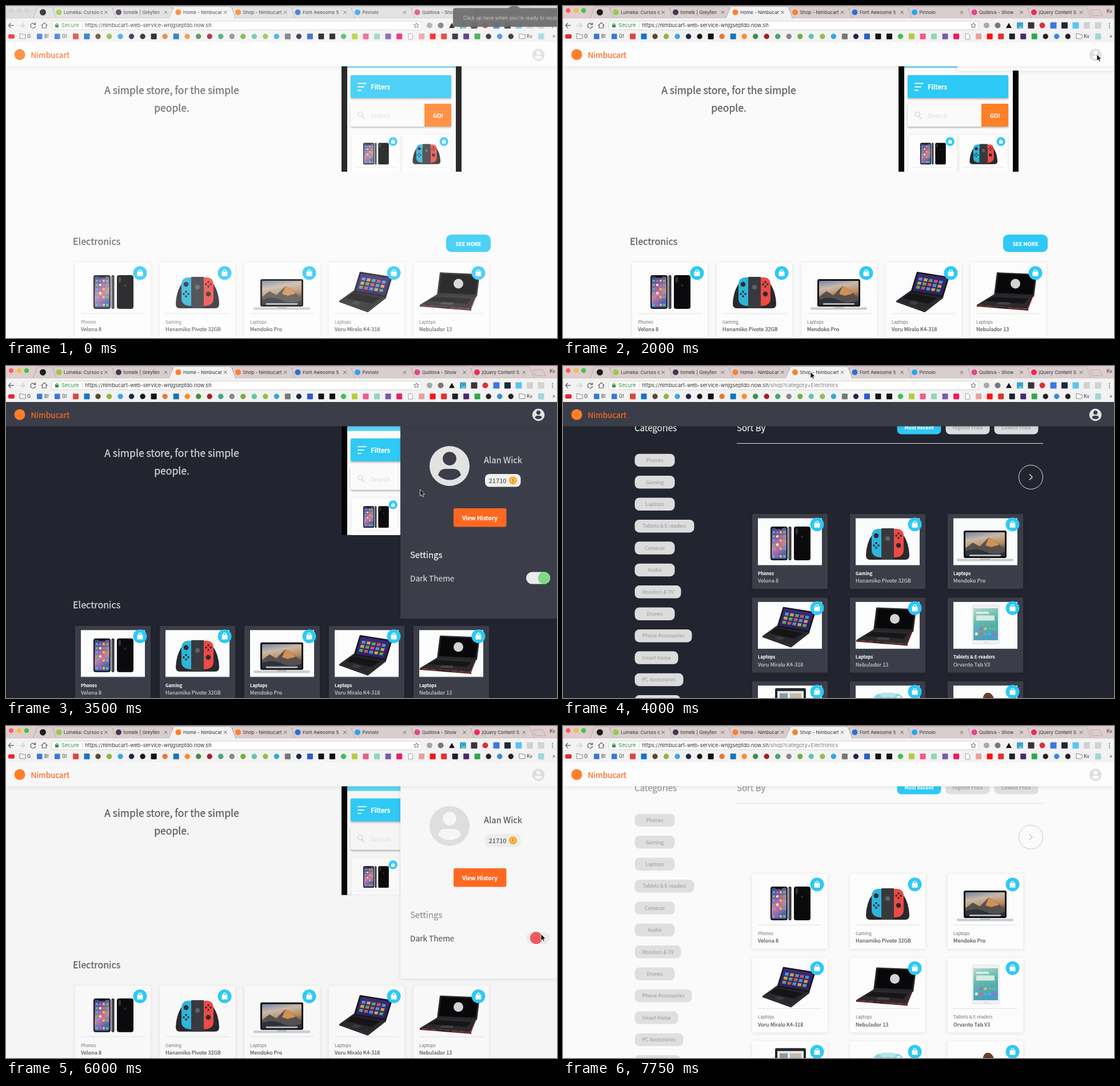
These frames come from a looping animation (964x581 px, 8000 ms). An HTML page:

```html
<!DOCTYPE html>
<html lang="en">
<head>
<meta charset="utf-8">
<title>Store theme demo</title>
<style>
html, body { margin: 0; width: 100%; height: 100%; overflow: hidden; background: #fafafa; }
svg { display: block; width: 100vw; height: 100vh; }
text { font-family: "Noto Sans CJK JP", "Noto Sans CJK SC", "Noto Sans CJK", "Noto Sans", sans-serif; white-space: pre; }
.ui text { font-family: Inter, Roboto, sans-serif; stroke: none; }
svg, .lit {
  --bg: #fafafa; --bar: #fcfcfc; --card: #fcfcfc; --img: #fcfcfc; --ink: #5f5f5f; --name: #4c4c4c;
  --cat: #868686; --catw: 400; --head: #999; --line: #dedede; --pill: #dfdfdf; --pilltext: #a2a2a2;
  --user: #dedede; --hole: #f8f8f8; --coin: #ececec; --arrow: #c6c6c6; --track: #ebebeb;
  --strip: #dfcccd; --tab: #d9cdce; --shade: rgba(0,0,0,.1);
}
svg.dim, .dim .lit { --bg: #f5f5f5; --bar: #f7f7f7; --card: #f8f8f8; --img: #f8f8f8; --hole: #f6f6f6; }
svg.dark {
  --bg: #22252f; --bar: #3b3e48; --card: #3b3e48; --img: #fcfcfc; --ink: #d2d2d5; --name: #d0d0d3;
  --cat: #f4f4f4; --catw: 700; --head: #ececee; --line: #e0e0e0; --pill: #dcdcdc; --pilltext: #a2a2a2;
  --user: #e2e2e2; --hole: #3b3e48; --coin: #f0f0f0; --arrow: #e4e4e4; --track: #ececec;
}
svg.idle { --strip: #d6d6d6; --tab: #dedede; }
.cat { font-weight: var(--catw); }
.shade { filter: drop-shadow(0 1px 3px var(--shade)); }
.lift { filter: drop-shadow(0 2px 1.5px rgba(0,0,0,.28)); }
svg.shop .home, svg:not(.shop) .shoponly { display: none; }
.light { fill: #ccc; }
svg:not(.idle) .light:nth-of-type(1) { fill: #f9605a; }
svg:not(.idle) .light:nth-of-type(2) { fill: #f6bd3b; }
svg:not(.idle) .light:nth-of-type(3) { fill: #3fc64a; }
</style>
</head>
<body>
<svg id="stage" viewBox="0 0 964 581" xmlns="http://www.w3.org/2000/svg"></svg>
<script>
const SKY = '#2ec9f4', ORANGE = '#ff7f27', HOT = '#ff6821';

const R = (x, y, w, h, fill, rx = 0, more = '') =>
  `<rect x="${x}" y="${y}" width="${w}" height="${h}" rx="${rx}" fill="${fill}" ${more}/>`;
const C = (x, y, r, fill, more = '') => `<circle cx="${x}" cy="${y}" r="${r}" fill="${fill}" ${more}/>`;
const P = (d, fill, more = '') => `<path d="${d}" fill="${fill}" ${more}/>`;
const L = (d, color, w = 1) => P(d, 'none', `stroke="${color}" stroke-width="${w}" stroke-linecap="round"`);
// A hairline outline gives the lettering its medium weight
const T = (x, y, s, size, fill, more = '') =>
  `<text x="${x}" y="${y}" font-size="${size}" fill="${fill}" stroke="${fill}" stroke-width="${size * .018}" ${more}>${s}</text>`;
const G = (more, ...parts) => `<g ${more}>${parts.join('')}</g>`;
const MID = 'text-anchor="middle"', BOLD = 'font-weight="700"';
const times = (n, f) => Array.from({ length: n }, (_, i) => f(i)).join('');
const gradient = (id, ...stops) => `<linearGradient id="${id}" x2=".3" y2="1">` +
  stops.map((c, i) => `<stop offset="${i / (stops.length - 1)}" stop-color="${c}"/>`).join('') + '</linearGradient>';

const defs = `<defs>${gradient('glow', '#33457f', '#75609c', '#d67c9a', '#4a62b4')}
  ${gradient('dusk', '#6f86a8', '#c9b9a8', '#b98a5c', '#3a3c44')}
  ${gradient('win', '#3b2c78', '#2f2160')}${gradient('sea', '#b9d9cf', '#5fb8a8', '#4a9ec0')}
  <clipPath id="device"><path d="M580 60H800V290H580Z"/></clipPath></defs>`;

// Product pictures, placed relative to their card's corner
const TILES = ['#4fb0e8', '#e8664f', '#f2f2f2', '#63c46a', '#f2c04a', '#c45ab8'];
const icons = (x, y, cols, rows, dx, dy, s) => times(cols * rows, i =>
  R(x + i % cols * dx, y + Math.floor(i / cols) * dy, s, s, TILES[(i * 5 + (i >> 2)) % 6], 1));

const art = {
  phone: R(32, 22, 30, 59, '#151518', 4) + R(34, 24.5, 26, 54, 'url(#glow)', 2.5) + R(41, 24, 12, 2.5, '#151518', 1) +
    icons(36, 30, 4, 5, 6, 7.2, 3.8) + icons(36, 72, 4, 1, 6, 6, 4) +
    R(63.5, 22, 5, 59, '#2c2d33', 2) + R(65, 24, 1, 55, '#777') +
    R(73, 22, 29, 59, '#0b0b0d', 4) + R(76, 25, 4, 10, '#33343a', 2) + C(87.5, 40, 2, '#2a2a2d'),
  pads: P('M39 36Q29 50 28 72Q28 80 35 80H97Q104 80 104 72Q103 50 93 36Z', '#29292c') +
    P('M55 26H49Q38 27 38 39V64Q39 76 55 76Z', '#2fb4da') + P('M77 26H83Q94 27 94 39V64Q93 76 77 76Z', '#ee4a46') +
    R(55, 25, 22, 55, '#38393d', 1) + C(66, 43, 4, '#606166') +
    C(46, 38, 4.3, '#2b2b2e') + C(85, 55, 4.3, '#2b2b2e') +
    times(4, i => { const a = i * Math.PI / 2, x = 4 * Math.cos(a), y = 4 * Math.sin(a);
      return C(46 + x, 55 + y, 1.7, '#222') + C(85 + x, 38 + y, 1.7, '#222'); }),
  book: R(28, 29, 75, 48, '#101012', 3) + R(31, 32, 69, 42, 'url(#dusk)') +
    P('M31 60L44 50L56 57L72 41L82 46L100 62V74H31Z', '#55504e') + P('M72 41L82 46L90 54L76 58L66 55Z', '#d08f55') +
    P('M31 65Q50 58 66 66T100 66V74H31Z', '#2f3238') + R(38, 71, 55, 3, '#aeb4bd', 1) +
    R(16, 78, 99, 4.5, '#c8c9cc', 2) + R(16, 77.5, 99, 1.5, '#e4e4e6') + R(57, 78, 17, 1.5, '#a5a6a9'),
  tiles: P('M43 49L100 60L68 85L18 67Z', '#29292d') + P('M42 53L90 62L74 72L30 62Z', '#151518') +
    P('M46 67L57 70L51 75L39 71Z', '#3c3c40') + P('M18 67L68 85L100 60V62L68 87L18 69Z', '#111') +
    G('transform="matrix(57 9 -11 36 54 16)"', R(0, 0, 1, 1, '#18181b', .03), R(.05, .07, .9, .84, 'url(#win)'),
      times(15, i => R(.12 + i % 5 * .155, .24 + Math.floor(i / 5) * .2, .11, .14, TILES[(i * 4 + (i >> 1)) % 6], 0, 'opacity=".8"'))),
  gamer: P('M42 55L110 58L101 81L11 74Z', '#2b2a2d') + P('M40 60L101 63L94 72L26 67Z', '#161618') +
    P('M50 69L70 70L68 74L46 73Z', '#454347') + P('M11 74L101 81V84L11 77Z', '#3a1a1c') + L('M14 76L40 78M66 80L99 82L109 60', '#b5342f') +
    G('transform="matrix(70 3 -5 40 46 17)"', R(0, 0, 1, 1, '#262528', .03), R(.04, .06, .92, .84, '#08080a')) +
    C(78.5, 37, 8.5, '#d2d2d2'),
  tablet: R(43, 13, 47, 68, '#f2f2f2', 3, 'stroke="#d5d5d5" stroke-width=".7"') + R(45, 18.5, 43, 56, 'url(#sea)') +
    R(50, 25, 22, 3, '#e8f4ef') + R(50, 31, 32, 9, '#d2ebe3', 1) + icons(48, 52, 5, 2, 7.8, 9, 4.5) + R(62, 77, 9, 2.2, '#ddd', 1),
  slate: R(40, 12, 54, 60, '#242529', 3) + R(44, 17, 46, 50, '#e5e8ea') + R(48, 21, 14, 9, '#8a98a0') + R(66, 21, 20, 9, '#c4b8a8'),
  cam: R(42, 22, 50, 50, '#8fd3e0', 9) + R(54, 20, 26, 8, '#b5e4ec', 4) + C(67, 42, 13, '#3a4a52') + R(82, 26, 6, 5, '#e8f6f8', 1),
  watch: P('M61 34Q62 20 70 20Q79 20 82 34V60H61Z', '#6b3f2a') + C(71, 41, 13, '#2a2a2d')
};

const bag = (x, y, r) => G(`transform="translate(${x} ${y}) scale(${r / 12})"`, C(0, 0, 12, SKY),
  R(-5, -2.5, 10, 8, '#fff', 1), L('M-2.6 -2V-4Q0 -7.5 2.6 -4V-2', '#fff', 1.3));

const card = (x, y, [pic, cat, name], k = 1) => G(`transform="translate(${x} ${y}) scale(${k})"`,
  R(0, 0, 132, 131, 'var(--card)', 2, 'class="shade"'), R(10, 7.5, 112, 81.5, 'var(--img)'), art[pic],
  R(10, 88.7, 112, .9, 'var(--line)'), bag(113.5, 18.3, 12),
  T(10, 107, cat, 7.7, 'var(--cat)', 'class="cat"'), T(10, 120.3, name, 9.1, 'var(--name)'));

const goods = [
  ['phone', 'Phones', 'Velona 8'], ['pads', 'Gaming', 'Hanamiko Pivote 32GB'], ['book', 'Laptops', 'Mendoko Pro'],
  ['tiles', 'Laptops', 'Voru Miralo K4-318'], ['gamer', 'Laptops', 'Nebulador 13'],
  ['tablet', 'Tablets &amp; E-readers', 'Orvanto Tab V3'],
  ['slate', 'Tablets', ''], ['cam', 'Cameras', ''], ['watch', 'Watches', '']
];

const person = (x, y, r) => G(`transform="translate(${x} ${y}) scale(${r})"`, C(0, 0, 1, 'var(--user)'),
  C(0, -.37, .34, 'var(--hole)'),
  P('M-.57 .46Q-.5 .14 -.2 .14H.2Q.5 .14 .57 .46Q.34 .7 0 .7T-.57 .46Z', 'var(--hole)'));

const device = G('clip-path="url(#device)" class="lit"',
  R(587, 60, 210, 240, '#050505'), R(597, 60, 190, 240, 'var(--bg)'), R(597, 60, 190, 48, '#5bd3f5'),
  R(603, 121, 176, 40, SKY, 2, 'class="lift"'),
  L('M616 135.5H630M616 141.5H626M616 147.5H621', '#fff', 1.8), T(638, 146, 'Filters', 11, '#fff', BOLD),
  R(603, 171, 176, 40, 'var(--bg)', 2, 'class="lift"'),
  C(620, 189.5, 4.2, 'none', 'stroke="#d0d0d0" stroke-width="1.2"'), L('M623 193L627 197.5', '#d0d0d0', 1.3),
  T(638, 196, 'Search', 10.9, '#e2e2e2'), R(732, 171, 47, 40, ORANGE, 1),
  T(756, 196, 'GO!', 9.6, '#fff', `${MID} ${BOLD}`),
  card(604.5, 225.5, goods[0], .64), card(693.5, 225.5, goods[1], .64));

const home = G('class="home"', G('id="scroll"',
  T(290, 153.5, 'A simple store, for the simple', 17.5, 'var(--ink)', MID),
  T(290, 184.5, 'people.', 17.5, 'var(--ink)', MID), device,
  T(117, 418, 'Electronics', 16.2, 'var(--ink)'),
  R(770, 400, 78, 30.5, SKY, 9), T(809, 419.5, 'SEE MORE', 9, '#fff', `${MID} ${BOLD}`),
  times(5, i => card(121 + 148 * i, 449, goods[i]))));

const groups = [['Phones', 70], ['Gaming', 70], ['Laptops', 70], ['Tablets &amp; E-readers', 104], ['Cameras', 70],
  ['Audio', 70], ['Monitors &amp; TV', 81], ['Drones', 70], ['Phone Accessories', 100], ['Smart Home', 76],
  ['PC Accessories', 85], ['Wearables', 80]];
const pill = (x, y, w, s, fill, ink, more = '') =>
  R(x, y, w, 22.5, fill, 8) + T(x + w / 2, y + 14.4, s, 8.6, ink, `${MID} ${more}`);

const shop = G('class="shoponly"',
  T(125, 114, 'Categories', 15, 'var(--head)'), T(304, 114, 'Sort By', 15, 'var(--head)'),
  pill(584.5, 97, 77, 'Most Recent', SKY, '#fff', BOLD),
  pill(669.5, 97, 77, 'Highest Price', 'var(--pill)', 'var(--pilltext)'),
  pill(754.5, 97, 77, 'Lowest Price', 'var(--pill)', 'var(--pilltext)'),
  R(304, 135, 536, 1, 'var(--line)'),
  C(818.5, 194.5, 21, 'none', 'stroke="var(--arrow)"'), L('M816.5 190L821 194.5L816.5 199', 'var(--arrow)', 1.4),
  groups.map(([s, w], i) => pill(125.5, 153.7 + 38.4 * i, w, s, 'var(--pill)', 'var(--pilltext)')).join(''),
  goods.map((g, i) => card(331 + 171 * (i % 3), 259 + 146.4 * Math.floor(i / 3), g)).join(''));

const panel = G('class="home"', G('id="panel"',
  R(690, 40, 280, 402, 'var(--bar)', 0, 'class="shade"'), person(776, 175, 35),
  T(836, 169.5, 'Alan Wick', 14.9, 'var(--ink)'),
  R(838, 189, 62.5, 22.5, 'var(--coin)', 8), T(844.5, 204.5, '21710', 11.2, '#555'),
  C(887, 200.3, 7, '#f3a92c'), C(887, 200.3, 5, '#f8c04a'), R(886, 197, 2, 6.6, '#d98a1c', 1),
  R(783, 249, 92.5, 32.5, HOT, 3), T(829, 270, 'View History', 10, '#fff', `${MID} ${BOLD}`),
  T(707, 336, 'Settings', 14.9, 'var(--head)'), T(707, 376.5, 'Dark Theme', 13.7, 'var(--ink)'),
  R(910, 360.5, 42, 21, 'var(--track)', 10.5), C(921, 371, 10.7, '#ef5a60', 'id="knob"')),
  R(961.5, 170, 4, 300, '#8b8b8b', 2, 'id="bar"'));

const header = R(0, 60, 964, 45.5, 'var(--bar)', 0, 'class="shade"') + C(24, 85, 9.5, ORANGE) +
  T(43.5, 90.7, 'Nimbucart', 13.6, HOT) + person(931.5, 85.5, 10.7);

// Browser window
const tabs = [['Lumeka: Cursos on', '#9acb3c'], ['tomelk | Greyfen', '#4a3350'], ['Home - Nimbucart', ORANGE],
  ['Shop - Nimbucart', ORANGE], ['Font Awesome 5', '#2b6fd6'], ['Pinnolo', '#2fa4ec'],
  ['Quillova - Show', '#e0478a'], ['jQuery Content S', '#ee2a5a']];
const tabX = i => 82 + 104.5 * i;
const tabShape = (x, w, fill) => P(`M${x - 6} 21.5L${x + 2} 2.5Q${x + 3} 1 ${x + 5} 1H${x + w - 4}Q${x + w - 2} 1 ${x + w - 1} 3L${x + w + 6} 21.5`,
  fill, 'stroke="#a99fa0" stroke-width=".7"');
const tabBody = ([s, color], i) => {
  const x = tabX(i);
  return C(x + 10.5, 11, 5, color) +
    `<svg x="${x + 19}" y="0" width="68" height="21">${T(0, 14, s, 8.1, '#333')}</svg>` +
    L(`M${x + 90.5} 8.5l5 5m0 -5l-5 5`, '#666', 1);
};
const activeTab = i => tabShape(tabX(i), 104.5, '#f3f2f2') + R(tabX(i) - 5, 20.5, 114, 2, '#f3f2f2');

const marks = ('d9483b 1a73c8 5a4a30 8bb83c 3aa5e8 1b2a4a 1a1a1a 111111 e87a2a 1a73b5 ff8a2b 3f8f3f a3202a 41a878 888888 ' +
  '74b03c 5cc9a0 8bc34a 2fa8dc 777777 1c2b4a 2a5ad0 111111 111111 3fbf5a b5cc3a ee5a8a 8fd8b8 7a5ab0 ee1a6a ffffff ' +
  'e7a0a0 ff1010 e03030 1a2030 4a2a6a 2fa84a 222222 3a8ae0 222222').split(' ');
const square = 'sscccccscscccccccccscssscssssssssssssccc';
const tools = ['#a9a9a9', '#777', '', '#3aa5c8', '#3a3338', '#d8303a', '#3a78e0', '#1c2a3a', '#5cc4f0', '#d2d2d2', '#d2d2d2'];
const folder = x => P(`M${x - 5} 48.5h4l1 1.5h5v7h-10z`, '#fafafa', 'stroke="#777" stroke-width=".9"');

const chrome = G('class="ui"',
  R(0, 0, 964, 22, 'var(--strip)'),
  G('', ...[9, 23, 36].map(x => C(x, 8, 4.2, '', 'class="light"'))),
  times(8, i => tabShape(tabX(7 - i), 104.5, 'var(--tab)')), tabShape(53, 29, 'var(--tab)'),
  R(0, 21, 964, 42, '#f3f2f2'), R(0, 20.7, 964, .6, '#b5acad'),
  G('class="home"', activeTab(2)), G('class="shoponly"', activeTab(3)),
  C(64.5, 11, 5.5, '#1c1c1c'), tabs.map(tabBody).join(''),
  P('M922 6.5H939L944.5 17H927Z', 'var(--tab)', 'stroke="#a99fa0" stroke-width=".7"'), T(951, 12, 'Kv', 8.3, '#333'),
  L('M13 34H4.5M8 30L4.5 34L8 38', '#666', 1.3), L('M24 34H32.5M29 30L32.5 34L29 38', '#cfcfcf', 1.3),
  L('M51 32A4.3 4.3 0 1 0 51.5 35.5M51.5 29.5V32.5H48.5', '#666', 1.3),
  L('M62 34L67 29L72 34M63.5 33.5V38.5H70.5V33.5', '#666', 1.2),
  R(80, 26.5, 647, 15, '#fff', 2, 'stroke="#c9c9c9" stroke-width=".7"'),
  R(86, 32.5, 6, 5, '#2f8f46', .5), L('M87.3 32.5V31Q89 28.5 90.7 31V32.5', '#2f8f46', 1),
  T(97, 37, 'Secure', 9.2, '#2f8f46'), R(133, 28.5, .8, 11, '#ccc'),
  T(138, 37, 'https://nimbucart-web-service-wnjgseptdo.now.sh<tspan class="shoponly" fill="#777">/shop?category=Electronics</tspan>', 9.2, '#333'),
  P('M718 29.5l1.3 3 3.2.3-2.4 2.1.7 3.1-2.8-1.7-2.8 1.7.7-3.1-2.4-2.1 3.2-.3z', 'none', 'stroke="#666" stroke-width=".9"'),
  tools.map((c, i) => {
    const x = 741 + 19.5 * i;
    if (!c) return P(`M${x} 29.5l5 9h-10z`, '#111');
    return [0, 1, 5].includes(i) ? C(x, 34, 5, c) : R(x - 5.5, 28.5, 11, 11, c, 1);
  }).join(''),
  T(797, 41, '10', 6.5, '#fff'), times(3, i => C(956, 30.5 + 3.5 * i, 1, '#666')),
  R(4, 49.5, 11, 7.5, '#e8262a', 2), folder(29), T(37, 56.3, 'G', 8.3, '#333'),
  R(54, 48.5, 9.5, 9.5, '#3a78dc', 1), T(67, 56.3, 'B!', 8.3, '#333'),
  R(85, 48.5, 9.5, 9.5, '#3a78dc', 1), T(98, 56.3, 'G!', 8.3, '#333'),
  marks.map((c, i) => {
    const x = 122 + 19.52 * i;
    if (c === 'ffffff') return P(`M${x - 3.5} 48.5h5l2.5 2.5v7h-7.5z`, '#fff', 'stroke="#888" stroke-width=".8"');
    return square[i] === 's' ? R(x - 5, 48.2, 10, 10, '#' + c, 1) : C(x, 53.2, 4.7, '#' + c);
  }).join(''),
  folder(903), T(911, 56.3, 'Kv', 8.3, '#333'), R(931, 48, 10.5, 10.5, '#9ed8d8', 1), T(956, 56, '»', 9, '#555'));

const cursor = P('M0 0V11.5L2.7 9.2L4.4 13L6.3 12.2L4.6 8.4H8Z', '#0a0a0a', 'stroke="#fff" stroke-width=".8" id="cursor"');
const tip = G('id="tip" class="ui"', P('M786 3.5H878L889 -2L900 3.5H970V36.5H786Q782 36.5 782 32.5V7.5Q782 3.5 786 3.5Z', '#6f6f6f', 'opacity=".95"'),
  T(800, 23.5, 'Click up here when you\'re ready to record', 8.6, '#c9c9c9'));

const stage = document.getElementById('stage');
stage.innerHTML = defs + R(0, 0, 964, 581, 'var(--bg)') + home + shop + panel + header + chrome + cursor +
  R(0, 0, 964, 581, '#fff', 0, 'id="veil"') + tip;
const parts = Object.fromEntries(['scroll', 'panel', 'knob', 'bar', 'cursor', 'veil', 'tip']
  .map(id => [id, document.getElementById(id)]));

// Pointer stops: time, x, y
const stops = [[0, 880, -30], [750, 880, -30], [1000, 884, 4], [1750, 934, 84], [2250, 934, 85], [2750, 929, 371],
  [3250, 929, 372], [3750, 520, 60], [4000, 433, 10], [4250, 410, 11], [4500, 345, 10], [4750, 345, 10],
  [5000, 513, 36], [5500, 905, 335], [5750, 936, 364], [6250, 936, 364], [6750, 520, 50], [7000, 438, 10],
  [7250, 438, 10], [7500, 470, -30], [8000, 470, -30]];

function pointer(t) {
  const i = stops.findIndex(s => s[0] > t);
  const [t0, x0, y0] = stops[i - 1], [t1, x1, y1] = stops[i];
  const u = (t - t0) / (t1 - t0), k = u * u * (3 - 2 * u);
  return [x0 + (x1 - x0) * k, y0 + (y1 - y0) * k];
}
const during = (t, a, b) => t >= a && t < b;
const move = (node, x, y) => node.setAttribute('transform', `translate(${x} ${y})`);

function draw(t) {
  const dark = during(t, 3250, 6000);
  const onShop = during(t, 4000, 4750) || t >= 7000;
  const on = during(t, 3000, 6000);
  stage.setAttribute('class', [dark && 'dark', onShop && 'shop', t < 250 && 'idle',
    !dark && during(t, 2250, 7000) && 'dim'].filter(Boolean).join(' '));
  move(parts.scroll, 0, t < 2500 ? 0 : 5.7);
  move(parts.panel, 0, t < 2000 ? -420 : t < 2250 ? -329 : t < 2500 ? -70 : 0);
  parts.knob.setAttribute('cx', dark ? 941.5 : t === 6000 ? 927.5 : 921);
  parts.knob.setAttribute('fill', on ? '#80d988' : '#ef5a60');
  parts.bar.setAttribute('opacity', during(t, 2500, 3250) ? 1 : 0);
  parts.veil.setAttribute('opacity', t < 250 ? .15 : t < 500 ? .06 : 0);
  parts.tip.setAttribute('opacity', t < 250 ? 1 : t < 500 ? .4 : 0);
  move(parts.cursor, ...pointer(t));
}

let start, last;
function tick(now) {
  start ??= now;
  const t = Math.floor((now - start) % 8000 / 250) * 250;
  if (t !== last) draw(last = t);
  requestAnimationFrame(tick);
}
draw(0);
requestAnimationFrame(tick);
</script>
</body>
</html>
```
